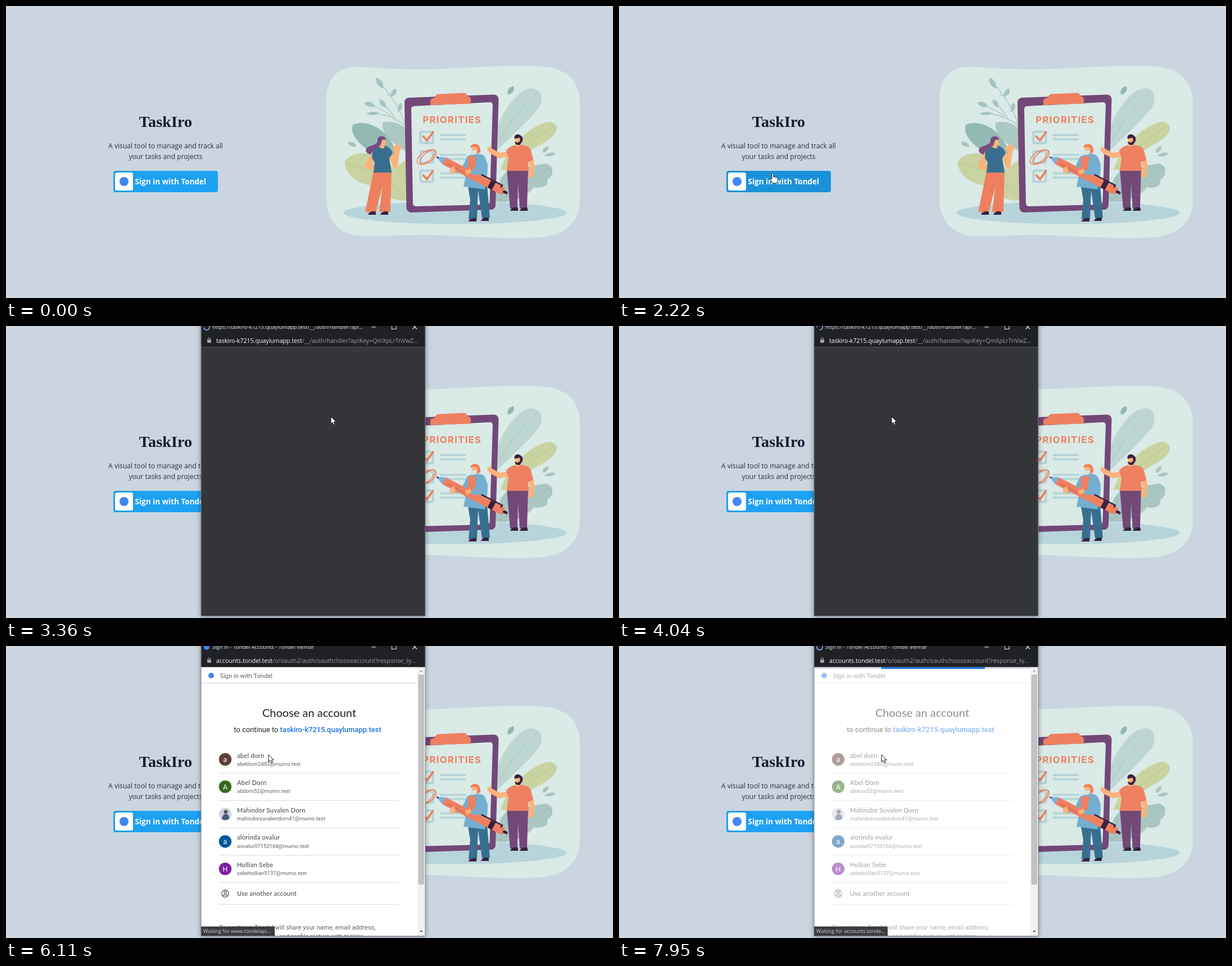
An HTML page that plays this animation: 1080 by 519 pixels, repeating every 8000 ms.

```html
<!DOCTYPE html>
<html lang="en">
<head>
<meta charset="utf-8">
<title>Sign in</title>
<style>
  html, body { margin: 0; width: 100%; height: 100%; overflow: hidden; background: #cbd5e0; }
  svg { display: block; width: 100vw; height: 100vh; }
  text, .line { font-family: "Open Sans", "Noto Sans", sans-serif; white-space: pre; }
  .line { overflow: hidden; text-overflow: ellipsis; color: #9aa0a6; line-height: 16px; }
  .line b { font-weight: 400; color: #fff; }
  #title { font-size: 9.5px; color: #e8eaed; }
  #url { font-size: 10.6px; }
  .rob text { font-family: Roboto, "Liberation Sans", sans-serif; }
  .rob text.name { font-family: Lato, "Open Sans", sans-serif; font-size: 11.2px; letter-spacing: .25px; fill: #3c4043; }
  .mail { font-size: 9.5px; fill: #5f6368; }
  #pop { transform-origin: 546.5px 250px; }
  .frame { filter: drop-shadow(0 2px 5px rgba(0, 0, 0, .4)); }
</style>
</head>
<body>
<svg viewBox="0 0 1080 519" preserveAspectRatio="none">
  <defs>
    <clipPath id="pageClip"><path d="M347 37H746V515H347Z"/></clipPath>
    <clipPath id="barClip"><path d="M347 37H732V41H347Z"/></clipPath>
    <path id="leaf" d="M0 -10C6 -4 5 5 0 10C-5 5 -6 -4 0 -10Z"/>
    <rect id="box" x="737.500" y="223.500" width="22" height="20" rx="2" fill="none" stroke="#b5d2d9" stroke-width="4"/>
    <path id="tick" d="M741.500 231L749 239L760.500 223" fill="none" stroke="#ee7f5f" stroke-width="3.600"/>
    <path id="rule" d="M772 229.500H818M772 237H818" stroke="#b5d2d9" stroke-width="3.400"/>
    <path id="shoe" d="M-7 3Q-6 -1 0 -3L6 -3Q8 0 7 3Z" fill="#38213f"/>
  </defs>

  <rect width="1080" height="519" fill="#cbd5e0"/>

  <!-- landing column -->
  <g text-anchor="middle" fill="#1a1a2e">
    <text x="284" y="214.500" font-size="28.300" font-weight="700" style="font-family:'Liberation Serif',serif">TaskIro</text>
    <g font-size="12.150" fill="#2d3038">
      <text x="284" y="252.500">A visual tool to manage and track all</text>
      <text x="284" y="271.700">your tasks and projects</text>
    </g>
  </g>
  <rect id="button" x="191" y="293" width="186" height="38" rx="4"/>
  <rect x="194" y="296" width="32" height="32" rx="3.500" fill="#fff"/>
  <circle cx="210" cy="312" r="8" fill="#4285f4"/>
  <text x="229.500" y="316.500" font-size="13.500" font-weight="700" fill="#fff">Sign in with Tondel</text>

  <!-- illustration -->
  <path fill="#daeae6" d="M570 163C572 128 592 107 624 108C680 110 700 114 770 112C850 108 900 105 945 107C990 107 1021 128 1021 172V345C1021 388 990 411 940 411.500C890 414 850 411 780 408C720 405 680 410 640 409C600 411 570 385 570 345Z"/>
  <ellipse cx="799" cy="367.500" rx="198.500" ry="20" fill="#b7d4da"/>

  <g fill="#c9d3a1">
    <path d="M602 277C622 250 672 262 690 290L713 272V345Q706 347 698 345C676 340 655 338 652 319C626 317 604 300 602 277Z"/>
    <path d="M880 290C893 250 940 206 968 206C984 208 984 224 968 236C948 251 920 258 890 292Z"/>
    <path d="M605 279C640 288 680 300 712 344M897 282Q932 238 974 214" fill="none" stroke="#b6c389"/>
  </g>
  <path fill="#92bab3" d="M617 211C645 199 692 225 695 273C652 270 608 236 617 211Z"/>
  <path fill="#abc8c4" d="M670 207C690 202 708 212 714 222V258C694 251 666 228 670 207Z"/>
  <path fill="#bed6d2" d="M866 240C878 192 910 147 936 146C957 148 957 171 944 186C922 212 890 240 868 262Z"/>
  <path fill="#a9c6c3" d="M870 347C872 318 884 292 904 288C922 288 940 283 960 280C978 284 974 303 963 309C967 322 948 325 939 322C926 341 896 353 870 347Z"/>
  <path d="M619 212Q658 226 692 270M674 210Q698 226 713 247M868 256Q895 200 944 154M875 345Q920 325 970 286" fill="none" stroke="#9bbcb8" stroke-width=".8"/>
  <path d="M712 214C690 196 668 190 642 191M712 214C700 180 680 150 662 134M678 158Q688 160 691 153M697 188Q702 184 701 178M686 196Q662 178 642 176M691 198Q682 184 670 172" fill="none" stroke="#a3c2be" stroke-width="1.200"/>
  <g fill="#a5c5c0">
    <use href="#leaf" transform="translate(665 137) rotate(-34) scale(1.100 1.150)"/>
    <use href="#leaf" transform="translate(690 154) rotate(32) scale(1 .85)"/>
    <use href="#leaf" transform="translate(647 175) rotate(-72)"/>
    <use href="#leaf" transform="translate(653 191) rotate(-92) scale(.75 1.150)"/>
    <use href="#leaf" transform="translate(670 173) rotate(-38) scale(1 .85)"/>
    <use href="#leaf" transform="translate(701 180) rotate(14) scale(.9 .85)"/>
    <use href="#leaf" transform="translate(616 246) rotate(-66) scale(.9 .85)"/>
    <use href="#leaf" transform="translate(898 150) rotate(35) scale(1.100 .9)" fill="#93b8b0"/>
    <use href="#leaf" transform="translate(960 255) rotate(42) scale(.8)"/>
    <use href="#leaf" transform="translate(968 264) rotate(78) scale(.75 1)"/>
  </g>

  <g stroke-linejoin="round">
    <path fill="#734878" stroke="#734878" stroke-width="16" d="M717 171L868.500 165.500L863 354L720.500 359Z"/>
    <path fill="#daeae6" stroke="#daeae6" stroke-width="10" d="M726 183L861 176L855.500 348L729 351Z"/>
  </g>
  <path fill="#ee8060" d="M755 176V168Q756 164 763 163Q764 157 770 156.500L814 154.500Q820 154.500 821 160Q827 161 827 166V173.500Z"/>
  <text x="741.500" y="207.500" font-size="16.500" font-weight="700" letter-spacing="1.400" fill="#ee7f5f" style="font-family:Inter,sans-serif">PRIORITIES</text>
  <use href="#box"/><use href="#box" y="35"/><use href="#box" y="69"/>
  <use href="#rule"/><use href="#rule" y="35"/><use href="#rule" y="68"/>
  <use href="#tick"/><use href="#tick" y="69"/>
  <g fill="none" stroke="#ee7f5f" stroke-width="1.500">
    <ellipse cx="748.500" cy="268.500" rx="19" ry="10" transform="rotate(-32 748.500 268.500)"/>
    <ellipse cx="750" cy="268" rx="17" ry="7" transform="rotate(-42 750 268)"/>
  </g>

  <!-- left figure -->
  <g stroke-linecap="round" stroke-linejoin="round">
    <path fill="#7a4a80" d="M662 240C658 250 641 247 640 257Q644 267 655 262Q664 255 664 246Z"/>
    <path d="M655 262L643 284L657 289M685 263L692 284L696 256" fill="none" stroke="#fbb27c" stroke-width="9"/>
    <path fill="#fbb27c" d="M687 252Q692 246 701 247L704 252L699 260L690 259Z"/>
    <path fill="#ee8060" d="M654 292H686L684 366H664L670 318L658 367L639 366L649 318Z"/>
    <path fill="#386f8f" d="M652 258Q660 249 676 249Q685 252 688 262L682 270L686 296H654L656 278L651 270Z"/>
    <path fill="#fbb27c" d="M666 238L675 237L676 246L672 249L674 252Q668 255 664 250Z"/>
    <path fill="#7a4a80" d="M661 241C659 229 676 229 676 238Q668 236 668 243L665 250Z"/>
    <path d="M667 318L661 330" stroke="#d4694f" stroke-width="1"/>
    <use href="#shoe" x="651" y="368"/><use href="#shoe" x="673" y="368"/>
  </g>

  <!-- right figure -->
  <g stroke-linecap="round" stroke-linejoin="round">
    <path d="M897 262L879 266L865 259M931 262L936 284L934 301" fill="none" stroke="#fbb27c" stroke-width="9"/>
    <path fill="#fbb27c" d="M856 253L861 250L869 257L864 263Q857 260 856 253Z"/>
    <path fill="#734878" d="M891 290H929L927 360H914L911 314L910 360H897Z"/>
    <path fill="#ee8060" d="M890 257Q897 247 911 247Q927 246 933 254L938 274L929 277L930 293H891L894 270Z"/>
    <path fill="#fbb27c" d="M906 233L916 232L917 242L914 249Q908 251 906 247Z"/>
    <path fill="#38213f" d="M905 236Q903 228 912 228Q921 231 919 240L914 247Q906 248 905 241L910 243L915 240L914 234Z"/>
    <use href="#shoe" x="904" y="361"/><use href="#shoe" x="921" y="361"/>
  </g>

  <!-- middle figure with pen -->
  <g stroke-linecap="round" stroke-linejoin="round">
    <path fill="#386f8f" d="M819 302L855 306L861 377H847L840 328L838 379H823L826 345Z"/>
    <use href="#shoe" x="830" y="380"/><use href="#shoe" x="852" y="379"/>
    <path fill="#74aed0" d="M820 268Q832 260 847 264Q856 268 857 292L852 326L814 321L820 294L795 297L793 288L813 284Z"/>
    <path fill="#ee8060" d="M823 268L837 266L834 291H821Z"/>
    <path fill="#fbb27c" d="M828 248H840L839 262L830 264Z"/>
    <path fill="#ee8060" d="M826 252Q827 245 835 245Q845 246 844 260L838 263L839 252Q832 249 826 252Z"/>
    <path fill="#d6e3e3" d="M827 257L838 256L837 263L830 265Z"/>
    <g transform="translate(765.500 268) rotate(27.200)">
      <path d="M15 -7H134Q138 0 134 7H15Z" fill="#ee8060"/>
      <path d="M0 0L16 -7V7Z" fill="#7eaedb"/>
      <path d="M0 0L4 -1.800V1.800Z" fill="#38213f"/>
      <path d="M106 -7H115V7H106Z" fill="#38213f"/>
      <path d="M136 0H140" stroke="#38213f" stroke-width="5"/>
      <path d="M87 -8.500H128L127 -5" fill="none" stroke="#38213f" stroke-width="2.600"/>
      <path d="M22 2H58" stroke="#ca6550" stroke-width="1.400"/>
    </g>
    <path fill="#fbb27c" d="M790 289L797 284L800 293L796 299L789 295ZM816 293L826 289L829 296L820 300Z"/>
    <path d="M853 282Q849 298 832 296" fill="none" stroke="#74aed0" stroke-width="8"/>
  </g>

  <!-- sign-in window -->
  <g id="pop">
    <path class="frame" fill="#202124" d="M347 -30H746V515H347Z"/>
    <rect id="body" x="347" y="37" width="399" height="478"/>
    <g id="page" clip-path="url(#pageClip)">
      <g id="content" class="rob">
        <g id="shell">
          <circle cx="365" cy="52.500" r="5" fill="#4285f4"/>
          <text x="380.500" y="56.500" font-size="11.200" fill="#5f6368">Sign in with Tondel</text>
          <path d="M347 66H732" stroke="#cfd2d6"/>
          <path d="M379 226H700M379 274.500H700M379 323H700M379 372H700M379 420.500H700M379 459.500H700" stroke="#dadce0"/>
          <g fill="none" stroke="#50565e" stroke-width="1.200">
            <circle cx="390" cy="440" r="6.300"/><circle cx="390" cy="438" r="2.100"/><path d="M385.500 444.300Q390 440 394.500 444.300"/>
          </g>
          <g font-size="11.200" fill="#5f6368">
            <text x="379" y="504">To continue, Tondel will share your name, email address,</text>
            <text x="379" y="520">language preference, and profile picture with taskiro.</text>
          </g>
          <text x="405.500" y="153" font-size="12.900" fill="#202124">to continue to <tspan id="link" fill="#1a73e8" font-weight="500">taskiro-k7215.quaylumapp.test</tspan></text>
        </g>
        <g id="accounts">
          <text x="539.500" y="126" font-size="20" text-anchor="middle" fill="#202124" style="font-family:Lato,sans-serif">Choose an account</text>
          <g id="rows"></g>
          <text class="name" x="411" y="443.500">Use another account</text>
        </g>
      </g>
      <g id="progress" clip-path="url(#barClip)">
        <path fill="#dfe3e8" d="M347 37H732V41H347Z"/>
        <rect id="barA" y="37" height="3.700" fill="#1a73e8"/>
        <rect id="barB" y="37" height="3.700" fill="#1a73e8"/>
      </g>
      <path fill="#f1f1f1" d="M732.500 37H745V515H732.500Z"/>
      <rect id="thumb" x="733.500" y="51" width="10.500" fill="#c1c1c1"/>
      <path fill="#a3a3a3" d="M736 46L738.800 43L741.600 46Z"/>
      <path fill="#505050" d="M736 506L738.800 509L741.600 506Z"/>
    </g>
    <g id="status">
      <path fill="#3a3c40" d="M347 498.500H478V515H347Z"/>
      <text id="statusText" x="351" y="510" font-size="9.200" fill="#cfd1d4"></text>
    </g>
    <path d="M347 37.500H746" stroke="#5f6368" stroke-opacity=".7"/>
    <circle id="favicon" cx="357" cy="2" r="5" fill="#4285f4"/>
    <path id="spinner" d="M357 -3A5 5 0 1 0 362 2" fill="none" stroke="#8ab4f8" stroke-width="1.600"/>
    <g id="lock" fill="#9aa0a6"><rect x="358" y="24" width="7" height="6" rx="1"/><path d="M359.500 24V22.500Q361.500 19 363.500 22.500V24" fill="none" stroke="#9aa0a6" stroke-width="1.200"/></g>
    <g id="info" fill="none" stroke="#9aa0a6"><circle cx="361.500" cy="25.500" r="5"/><path d="M361.500 25V28.500M361.500 22.500V23.700" stroke-width="1.300"/></g>
    <foreignObject x="367" y="-6" width="270" height="18"><div id="title" class="line"></div></foreignObject>
    <foreignObject x="374" y="17.500" width="360" height="18"><div id="url" class="line"></div></foreignObject>
    <path d="M650 2H658M686.500 -2H694V5.500H686.500ZM723.500 -2L731 5.500M731 -2L723.500 5.500" fill="none" stroke="#e8eaed" stroke-width="1.100"/>
    <path d="M347 -30H746V515.500H347Z" fill="none" stroke="#80868b" stroke-width="1"/>
  </g>

  <g id="cursor" fill="#fff" stroke="#15181c" stroke-linejoin="round">
    <path id="arrow" d="M0 0V13L3 10.300L5 15L7.300 14L5.300 9.500H9.300Z"/>
    <path id="hand" d="M-1.500 1.500Q0 -1 1.500 1.500V7L3.500 6.500L5 7.500L7 7.500L9 9V13L7.500 18H0L-4.500 11.500Q-5 9 -3 9.500L-1.500 11Z"/>
  </g>
</svg>

<script>
const LOOP = 8000;
const T = { enter: 1130, hover: 2130, open: 2800, blank: 3060, leave: 3080, paper: 4150, shell: 4330, accounts: 5500, loaded: 6110, pick: 6280 };
const $ = id => document.getElementById(id);
const show = (id, on) => { $(id).style.display = on ? '' : 'none'; };
const setText = (id, html) => { const el = $(id); if (el.dataset.now !== html) el.innerHTML = el.dataset.now = html; };
const clamp = v => Math.max(0, Math.min(1, v));

// Linear interpolation through [time, ...values] points
function along(points, t) {
  if (t <= points[0][0]) return points[0].slice(1);
  for (let i = 1; i < points.length; i++) {
    const a = points[i - 1], b = points[i];
    if (t <= b[0]) return a.slice(1).map((v, k) => v + (b[k + 1] - v) * (t - a[0]) / (b[0] - a[0]));
  }
  return points[points.length - 1].slice(1);
}

const people = [
  ['abel dorn', 'abeldorn2483', '#5d4037'],
  ['Abel Dorn', 'abdorn52', '#33691e'],
  ['Mahindor Suvalen Dorn', 'mahindorsuvalendorn41', ''],
  ['alorinda ovalur', 'aovalur07153164', '#01579b'],
  ['Hollian Sebe', 'sebehollian5137', '#7b1fa2']
];
const silhouette = '<circle r="11" fill="#cdd2dc"/><circle cx="1" cy="-4" r="3.500" fill="#5a5560"/><path d="M-6 9Q-5 0 1 0Q7 0 7.500 8Q1 13 -6 9Z" fill="#4a5a80"/>';
$('rows').innerHTML = people.map(([name, mail, color], i) => {
  const y = 201.5 + i * 48.65;
  const face = color
    ? `<circle r="11.200" fill="${color}"/><text y="4.500" font-size="12.500" text-anchor="middle" fill="#fff">${name[0]}</text>`
    : silhouette;
  return `<g transform="translate(390 ${y})">${face}<text class="name" x="21" y="-3">${name}</text><text class="mail" x="21" y="11.300">${mail}@mumo.test</text></g>`;
}).join('');

const path = [
  [1130, 1066, 508], [1360, 760, 425], [1600, 579, 352], [1750, 570, 350], [2080, 300, 290], [2220, 273.5, 297],
  [3080, 273.5, 297], [3360, 578, 161], [3420, 578, 161], [3850, 485, 161],
  [5600, 485, 161], [5850, 508, 180], [5980, 485, 198], [6110, 467, 193]
];

// Progress segments: phase, centre, width (fractions of the track)
const segA = [[0, -.95, .08], [.2, -.95, .08], [.37, -.6, .08], [.59, .12, .52], [.69, .51, .673], [1, 1.25, .08]];
const segB = [[0, -.05, .08], [.19, .2, .4], [.344, .548, .478], [.48, .95, .6], [.66, 1.5, .4], [1, 1.6, .08]];

function setBar(id, seg, phase) {
  const [mid, w] = along(seg, phase);
  $(id).setAttribute('x', 347 + 385 * (mid - w / 2));
  $(id).setAttribute('width', 385 * w);
}

function windowBar(t) {
  const app = 'taskiro-k7215.quaylumapp.test', rest = '/__/auth/handler?apiKey=QmXpLrTnVwZkHdBsYcGfJ';
  if (t < T.blank) {
    setText('title', 'Untitled - Tondel Velmar');
    setText('url', 'about:<b>blank</b>');
  } else if (t < T.shell) {
    setText('title', 'https://' + app + rest);
    setText('url', `<b>${app}</b>${rest}`);
  } else {
    const query = t < T.accounts ? '/o/oauth2/auth?response_type=code&amp;client_id=472916' : '/o/oauth2/auth/oauthchooseaccount?response_type=code';
    setText('title', 'Sign in - Tondel Accounts - Tondel Velmar');
    setText('url', '<b>accounts.tondel.test</b>' + query);
  }
  const early = t < T.blank;
  show('info', early);
  show('lock', !early);
  const idle = (t >= T.loaded && t < T.pick) || (t >= 7030 && t < 7900);
  show('favicon', idle);
  show('spinner', !idle);
  $('spinner').setAttribute('transform', `rotate(${t * .4 % 360} 357 2)`);
}

function popup(t) {
  show('pop', t >= T.open);
  if (t < T.open) return;
  const [alpha, scale] = along([[T.open, .05, .955], [2900, .6, .979], [3000, 1, 1]], t);
  $('pop').style.opacity = alpha;
  $('pop').style.transform = scale < 1 ? `scale(${scale})` : 'none';
  $('body').setAttribute('fill', t < T.blank || t >= T.paper ? '#fff' : '#35363a');
  windowBar(t);

  show('page', t >= T.paper);
  show('shell', t >= T.shell);
  show('accounts', t >= T.accounts);
  show('link', t >= T.accounts);
  $('thumb').setAttribute('height', t < T.accounts ? 376 : 373);
  $('content').style.opacity = t < T.pick ? 1 : .5;

  show('progress', t >= T.pick);
  const phase = (t - 6203) / 1300 % 1;
  setBar('barA', segA, phase);
  setBar('barB', segB, phase);

  const late = t > 7500;
  setText('statusText', late ? 'Waiting for accounts.tonde...' : 'Waiting for www.tondelapi...');
  $('status').style.opacity = late ? clamp((t - 7800) / 100) : t < T.shell ? 0 : clamp((7170 - t) / 140);
}

function draw(t) {
  const over = t >= T.hover && t < T.leave;
  $('button').setAttribute('fill', over ? '#1b91da' : '#1da1f2');
  popup(t);
  show('cursor', t >= T.enter);
  show('hand', over);
  show('arrow', !over);
  const [x, y] = along(path, t);
  $('cursor').setAttribute('transform', `translate(${x} ${y})`);
}

const start = performance.now();
function tick() {
  draw((performance.now() - start) % LOOP);
  requestAnimationFrame(tick);
}
tick();
</script>
</body>
</html>
```
